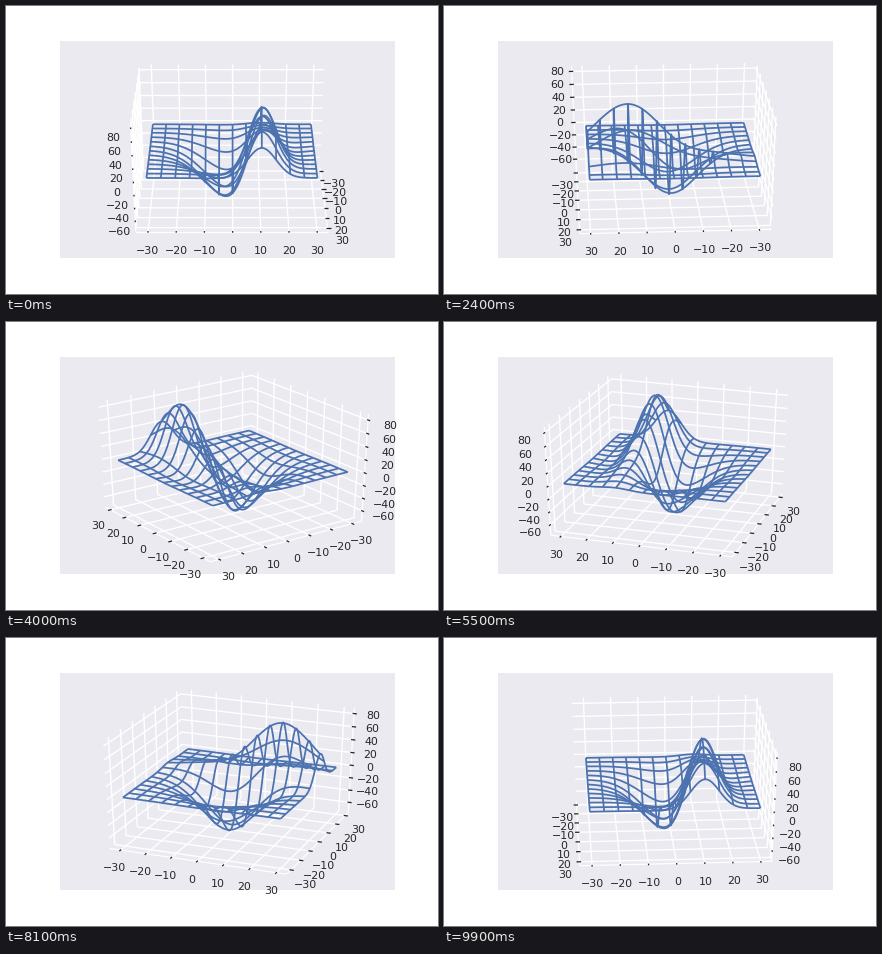
Animation of 432 by 288 pixels, one loop 10000 ms. Source, as a matplotlib script:

```python
import numpy as np
import matplotlib.pyplot as plt
from matplotlib.animation import FuncAnimation
from matplotlib.collections import LineCollection

plt.rcParams["font.family"] = "DejaVu Sans"
plt.rcParams["toolbar"] = "None"

W, H, DPI = 432, 288, 72
FRAMES, INTERVAL = 100, 100
ELEV, DIST = np.radians(30), 10
INK = "0.15"
TICKS = (np.arange(-30, 31, 10), np.arange(-30, 31, 10), np.arange(-60, 81, 20))
TICK_DIR = (1, 0, 0)
EDGE_FLIP = (1, 0, 0)          # axis whose side is swapped to reach the outer edge

STEP = 1 / 12                  # tick unit inside the unit cube
SIDE = 0.5 + STEP / 4          # half size of the drawn box
LABEL_PAD = 11.5 * 48 / (0.775 * W + 0.755 * H) * STEP


def surface():
    s = np.arange(-3, 3, 0.05)
    x, y = np.meshgrid(s, s)
    dip = np.exp(-(x**2 + y**2) / 2) / (2 * np.pi)
    peak = np.exp(-(((x - 1) / 1.5) ** 2 + ((y - 1) / 0.5) ** 2) / 2) / (1.5 * np.pi)
    return np.stack([10 * x, 10 * y, 500 * (peak - dip)], axis=-1)


def project(p, az):
    p = np.asarray(p, float)
    c, s, ce, se = np.cos(az), np.sin(az), np.cos(ELEV), np.sin(ELEV)
    depth = DIST - p @ (c * ce, s * ce, se)
    u = p @ (-s, c, 0)
    v = p @ (-c * se, -s * se, ce)
    return np.stack([u / depth, v / depth], axis=-1)


def put(p, i, value):
    q = p.copy()
    q[i] = value
    return q


mesh = surface()
lo, hi = mesh.min((0, 1)), mesh.max((0, 1))
margin = np.array([0.05, 0.05, 0]) * (hi - lo)
lo, hi = lo - margin, hi + margin
mesh = (mesh - lo) / (hi - lo) - 0.5
marks = [(t - lo[i]) / (hi[i] - lo[i]) - 0.5 for i, t in enumerate(TICKS)]
picks = list(range(0, len(mesh), 10)) + [len(mesh) - 1]
wires = [mesh[i] for i in picks] + [mesh[:, i] for i in picks]

fig = plt.figure(figsize=(W / DPI, H / DPI), dpi=DPI, facecolor="white")
ax = fig.add_axes([0.125, 0.125, 0.775, 0.755], facecolor="#EAEAF0")
ax.set(xlim=(-0.095, 0.09), ylim=(-0.095, 0.09), xticks=[], yticks=[])
for spine in ax.spines.values():
    spine.set_visible(False)


def lines(color, width, z):
    art = LineCollection([], colors=color, linewidths=width, zorder=z)
    return ax.add_collection(art, autolim=False)


rims, grids, ticks, labels = [], [], [], []
for i in range(3):
    rims.append(lines("white", 1.25, 2 + i))
    grids.append(lines("white", 1.4, 2.1 + i))
    ticks.append(lines(INK, 1.25, 2.2 + i))
    labels.append([ax.text(0, 0, str(t).replace("-", "\u2212"), size=11, color=INK,
                           ha="center", va="top", zorder=2.3 + i) for t in TICKS[i]])
wire = lines("#4C72B0", 1.75, 6)


def draw_axis(i, far, az):
    j, k = (i + 1) % 3, (i + 2) % 3
    flip = EDGE_FLIP[i]
    edge = put(far, flip, -far[flip])
    rims[i].set_segments([project([edge, put(edge, i, -edge[i])], az)])

    d = TICK_DIR[i]
    unit = np.sign(far[d]) * STEP
    grid, dashes = [], []
    for m, label in zip(marks[i], labels[i]):
        base = put(far, i, m)
        grid.append(project([put(base, j, -far[j]), base, put(base, k, -far[k])], az))
        pos = put(edge, i, m)
        dashes.append(project([put(pos, d, pos[d] + 0.1 * unit),
                               put(pos, d, pos[d] - 0.2 * unit)], az))
        away = put(np.sign(pos), i, 0)
        label.set_position(project(pos + LABEL_PAD * away, az))
    grids[i].set_segments(grid)
    ticks[i].set_segments(dashes)


def update(n):
    az = 2 * np.pi * n / FRAMES
    view = np.array([np.cos(az), np.sin(az), np.sin(ELEV)])
    far = np.where(view < -1e-9, SIDE, -SIDE)
    for i in range(3):
        draw_axis(i, far, az)
    wire.set_segments([project(w, az) for w in wires])
    return []


anim = FuncAnimation(fig, update, frames=FRAMES, interval=INTERVAL,
                     repeat=True, repeat_delay=0, blit=False)
plt.show()
```
